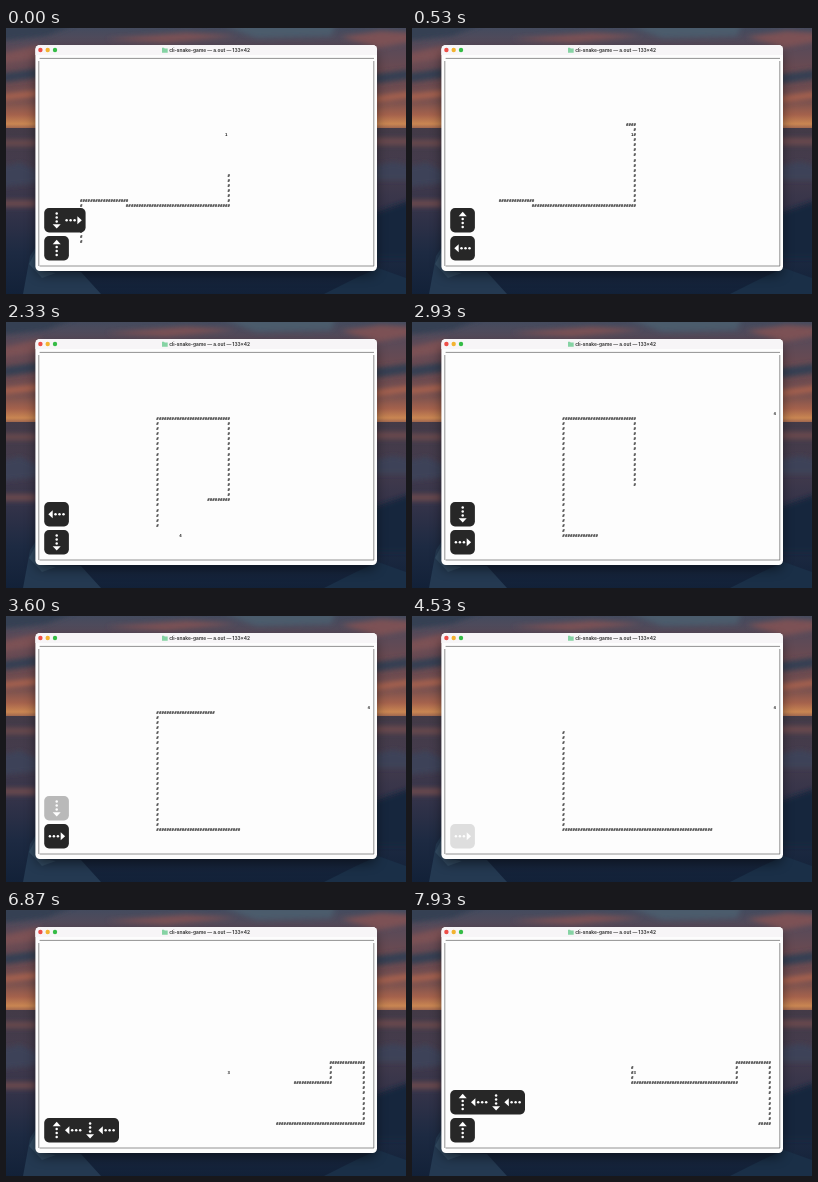
Animation, 400 px wide and 266 px high, one loop 8000 ms. Source, as an HTML page:

```html
<!DOCTYPE html>
<html lang="en">
<head>
<meta charset="utf-8">
<title>Terminal snake</title>
<style>
  html, body { margin: 0; width: 100%; height: 100%; overflow: hidden; background: #1b2638; }
  svg { display: block; width: 100vw; height: 100vh; }
  .title { font: 700 4.8px Inter, sans-serif; fill: #3c3c3c; }
  .cell { font: 700 4.1px "DejaVu Sans Mono", monospace; fill: #1c1c1c; text-anchor: middle; text-rendering: geometricPrecision; }
</style>
</head>
<body>
<svg id="stage" viewBox="0 0 400 266">
  <defs>
    <linearGradient id="sky" x2="0" y2="1">
      <stop offset="0" stop-color="#444b5e"/>
      <stop offset=".2" stop-color="#5a4a58"/>
      <stop offset=".45" stop-color="#6d4a50"/>
      <stop offset=".7" stop-color="#6e4d50"/>
      <stop offset=".86" stop-color="#a5624c"/>
      <stop offset=".95" stop-color="#c98652"/>
      <stop offset="1" stop-color="#96604e"/>
    </linearGradient>
    <linearGradient id="sea" x2="0" y2="1">
      <stop offset="0" stop-color="#433a47"/>
      <stop offset=".25" stop-color="#453c4d"/>
      <stop offset=".5" stop-color="#343349"/>
      <stop offset=".75" stop-color="#1d2a42"/>
      <stop offset="1" stop-color="#122138"/>
    </linearGradient>
    <filter id="soft" x="-30%" y="-80%" width="160%" height="260%"><feGaussianBlur stdDeviation="2.5"/></filter>
    <filter id="shade" x="-10%" y="-10%" width="120%" height="125%"><feGaussianBlur stdDeviation="6"/></filter>
  </defs>

  <rect width="400" height="101" fill="url(#sky)"/>
  <g filter="url(#soft)">
    <path fill="#7c5155" d="M-5 26L34 17V31L-5 36ZM100 11L180 5L230 8L160 15ZM335 9L375 3L405 5V14L372 20Z"/>
    <path fill="#4b5b6c" d="M215 -4H330L325 8L250 10Z"/>
    <path fill="#363f52" d="M-5 -4H70L40 8L-5 13ZM-5 45L32 40V50L-5 55ZM368 46L405 41V51L368 56Z"/>
    <path fill="#a5604d" d="M-5 66L32 62V69L-5 73ZM368 68L405 63V70L368 75Z"/>
  </g>
  <rect y="100" width="400" height="166" fill="url(#sea)"/>
  <g filter="url(#soft)">
    <path fill="#6a4a4d" d="M-5 112H30V118H-5ZM368 110H405V117H368ZM-5 172H30V179H-5Z"/>
    <path fill="#3c4359" d="M-5 139L14 135L32 143V155L-5 159ZM368 138L388 134L405 138V152H368Z"/>
    <path fill="#17263e" d="M368 185L405 172V230H368Z"/>
  </g>
  <path fill="#243951" d="M17 266L24 228L32 216V242L75 244L95 266Z"/>
  <path fill="#324a61" d="M23 236L32 219V242L50 245L36 250Z"/>
  <path fill="#1a2f47" d="M318 266L350 250L372 240L400 250V266Z"/>

  <rect x="30" y="23" width="340" height="224" rx="6" fill="#000" opacity=".5" filter="url(#shade)"/>
  <rect x="29.4" y="17" width="341.6" height="226" rx="4.5" fill="#fdfdfd"/>
  <path d="M29.4 27V21.5a4.5 4.5 0 0 1 4.5-4.5H366.5a4.5 4.5 0 0 1 4.5 4.5V27Z" fill="#f7f5f7"/>
  <circle cx="34.4" cy="22" r="2.2" fill="#ee4e48"/>
  <circle cx="41.7" cy="22" r="2.2" fill="#f3b330"/>
  <circle cx="49" cy="22" r="2.2" fill="#35bc46"/>
  <path d="M156 19.8h2l.7.7h3v4.3h-5.7Z" fill="#86d3a4"/>
  <text class="title" x="163.2" y="23.8">cli-snake-game — a.out — 133×42</text>
  <g fill="none" stroke="#777" stroke-width=".8">
    <path d="M33.6 30.4H368M33.6 238H368"/>
    <path d="M32.8 33V238M367.8 33V238"/>
  </g>
  <g id="board"></g>
  <g id="keys"></g>
</svg>
<script>
const LOOP = 8000, FRAME = 1000 / 15;
const LEAD = 12;                         // ms of slack so a late tick still lands on its step
const SLOW = 39.5, FAST = 35.6;          // ms per cell, before and after the meal
const START = 73, MEAL = 143, MEAL_AT = (MEAL - START) * SLOW;
const HOLD = 2000, FADE = 144, GROUP_GAP = 500;

const corners = [[16, 23], [16, 15], [34, 15], [34, 16], [74, 16], [74, 0], [46, 0],
  [46, 23], [127, 23], [127, 11], [114, 11], [114, 15], [73, 15], [73, 8]];
const foods = [
  { text: 1, col: 73, row: 2, from: 0, to: 630 },
  { text: 4, col: 55, row: 23, from: 630, to: MEAL_AT },
  { text: 4, col: 129, row: -1, from: MEAL_AT, to: 5200 },
  { text: 3, col: 74, row: 13, from: 5200, to: LOOP }
];

const board = document.getElementById("board");
const keys = document.getElementById("keys");

function add(parent, tag, attrs, text = "") {
  const el = document.createElementNS("http://www.w3.org/2000/svg", tag);
  for (const name in attrs) el.setAttribute(name, attrs[name]);
  el.textContent = text;
  return parent.appendChild(el);
}
const show = (el, on) => el.setAttribute("visibility", on ? "visible" : "hidden");
const glyph = (text, col, row) =>
  add(board, "text", { class: "cell", x: 34.5 + col * 2.545, y: 97.9 + row * 5.09 }, text);

const distance = t => t < MEAL_AT ? START + t / SLOW : MEAL + (t - MEAL_AT) / FAST;
const timeAt = d => d < MEAL ? (d - START) * SLOW : MEAL_AT + (d - MEAL) * FAST;

// Walk the route once: one glyph per cell, one key press per corner.
const cells = [glyph("#", ...corners[0])];
const presses = [];
for (let i = 1; i < corners.length; i++) {
  const [c0, r0] = corners[i - 1], [c1, r1] = corners[i];
  const dx = Math.sign(c1 - c0), dy = Math.sign(r1 - r0);
  const n = Math.abs(c1 - c0) + Math.abs(r1 - r0);
  if (i > 1) presses.push({ at: timeAt(cells.length - 1), angle: Math.atan2(dy, dx) * 180 / Math.PI });
  for (let k = 1; k <= n; k++) cells.push(glyph("#", c0 + dx * k, r0 + dy * k));
}
for (const f of foods) f.el = glyph(f.text, f.col, f.row);

// Quick presses share one box.
const groups = [];
let last = -Infinity;
for (const p of presses) {
  if (p.at - last > GROUP_GAP) {
    const el = add(keys, "g", {});
    groups.push({ el, box: add(el, "rect", { height: 24.4, rx: 4.8, fill: "#272727" }), presses: [] });
  }
  const g = groups[groups.length - 1];
  p.el = add(g.el, "g", {
    fill: "#fff", transform: `translate(${12.5 + g.presses.length * 16.7} 12.2) rotate(${p.angle})`
  });
  add(p.el, "path", { d: "M8.4 0L4 -4V4Z" });
  for (const x of [1.2, -2.8, -6.8]) add(p.el, "circle", { cx: x, r: 1.25 });
  g.presses.push(p);
  last = p.at;
}

function drawKeys(t) {
  let above = 0;
  for (let i = groups.length - 1; i >= 0; i--) {
    const g = groups[i];
    const down = g.presses.filter(p => p.at <= t);
    const age = down.length ? t - down[down.length - 1].at : Infinity;
    const alpha = Math.min(1, Math.max(0, 1 - (age - HOLD) / FADE));
    show(g.el, alpha > 0);
    if (!down.length) continue;
    g.el.setAttribute("opacity", alpha);
    g.el.setAttribute("transform", `translate(38.2 ${208 - above * 28})`);
    g.box.setAttribute("width", 24.7 + (down.length - 1) * 16.7);
    for (const p of g.presses) p.el.setAttribute("display", p.at <= t ? "inline" : "none");
    above++;
  }
}

function draw(time) {
  const t = Math.floor((time + LEAD) % LOOP / FRAME) * FRAME;
  const head = Math.floor(distance(t));
  const tail = head - 73 - Math.min(4, Math.max(0, head - MEAL));
  cells.forEach((el, d) => show(el, d >= tail && d <= head));
  for (const f of foods) show(f.el, t >= f.from && t < f.to);
  drawKeys(t);
}

const began = performance.now();
function tick() {
  draw(performance.now() - began);
  requestAnimationFrame(tick);
}
tick();
</script>
</body>
</html>
```
